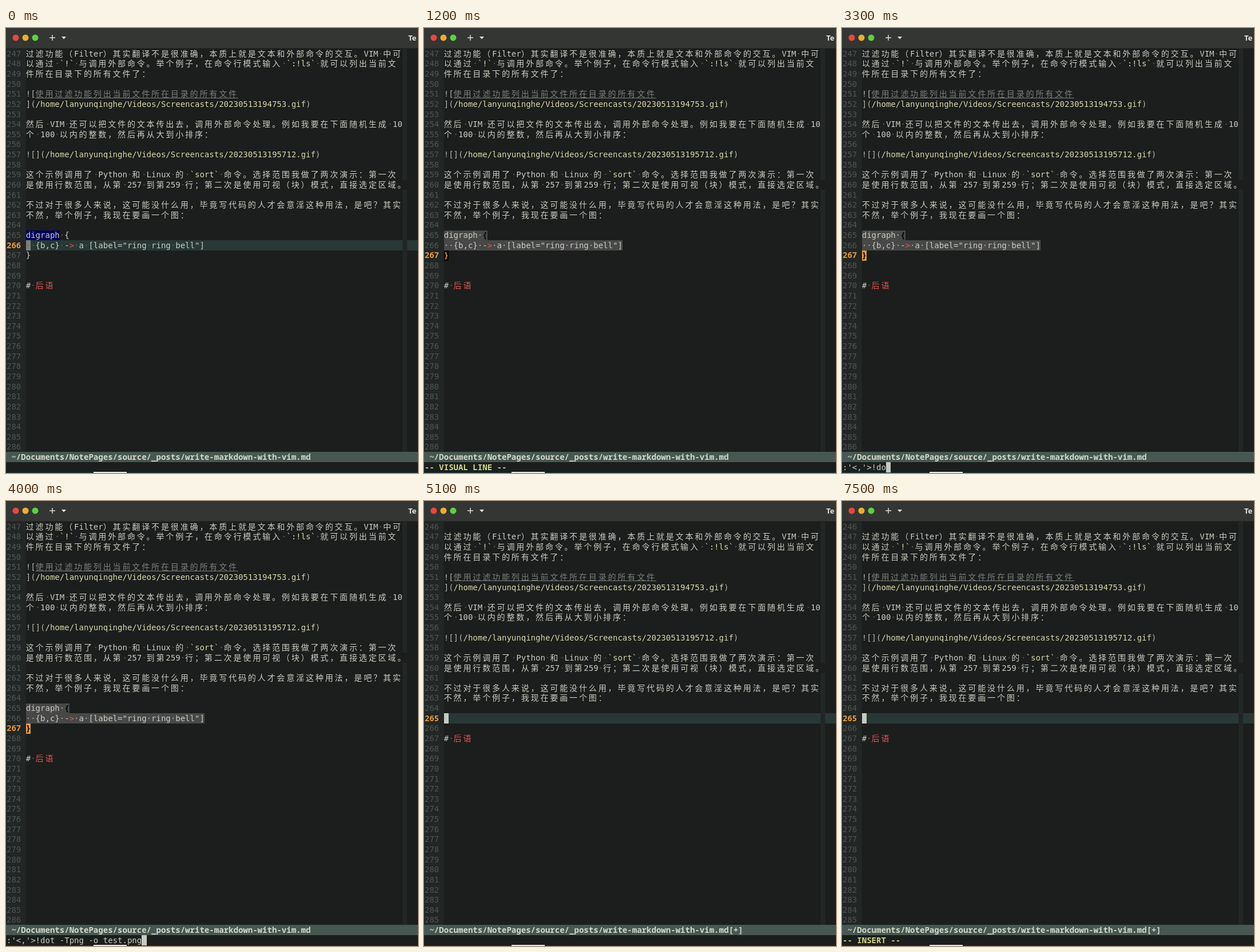
These frames come from a looping animation (720x778 px, 8 s). An HTML page with a canvas:

```html
<!DOCTYPE html>
<html lang="zh-CN">
<head>
<meta charset="utf-8">
<title>Terminal editor</title>
<style>
html, body { margin: 0; width: 100%; height: 100%; overflow: hidden; background: #1c1f1e; }
canvas { display: block; width: 720px; height: 778px; }
</style>
</head>
<body>
<canvas id="stage" width="720" height="778"></canvas>
<script>
const ctx = document.getElementById('stage').getContext('2d');
const LOOP = 8000, CW = 8.435, RH = 17.635, X0 = 1, Y0 = 36.2, BASE = 13.5;
const GUTTER = 4, ROWS = 40, MARGIN_COL = 78;
const MONO = '14px "DejaVu Sans Mono", monospace';
const MONO_BOLD = 'bold 14px "Noto Sans Mono", monospace';
const CJK = '14px "Noto Sans CJK SC", "Noto Sans CJK", sans-serif';
const C = {
  bg: '#1b1e1d', gutter: '#222625', line: '#283836', text: '#cbcbc0', dim: '#7c7f7a',
  dot: '#5c605d', num: '#505654', cur: '#e79a3c', code: '#d9d6a9', red: '#e2564c',
  visual: '#474847', status: '#465851', mode: '#d6d88a', block: '#c6cac2', word: '#00005c'
};

// Buffer text by line number; each part is [text, colour, underline].
const plain = s => [[s, C.text]];
const link = (head, path) => [[head, '#b4b5ab'], [path, C.code], [')', '#b4b5ab']];
const folder = '/home/lanyunqinghe/Videos/Screencasts/';
const prose = {
  247: plain('过滤功能（Filter）其实翻译不是很准确，本质上就是文本和外部命令的交互。VIM 中可'),
  248: [['以通过 ', C.text], ['`!`', C.code], [' 与调用外部命令。举个例子，在命令行模式输入 ', C.text],
        ['`:!ls`', C.code], [' 就可以列出当前文', C.text]],
  249: plain('件所在目录下的所有文件了：'),
  251: [['![', '#b4b5ab'], ['使用过滤功能列出当前文件所在目录的所有文件', C.dim, true]],
  252: link('](', folder + '20230513194753.gif'),
  254: plain('然后 VIM 还可以把文件的文本传出去，调用外部命令处理。例如我要在下面随机生成 10'),
  255: plain('个 100 以内的整数，然后再从大到小排序：'),
  257: link('![](', folder + '20230513195712.gif'),
  259: [['这个示例调用了 Python 和 Linux 的 ', C.text], ['`sort`', C.code],
        [' 命令。选择范围我做了两次演示：第一次', C.text]],
  260: plain('是使用行数范围，从第 257 到第259 行；第二次是使用可视（块）模式，直接选定区域。'),
  262: plain('不过对于很多人来说，这可能没什么用，毕竟写代码的人才会意淫这种用法，是吧？其实'),
  263: plain('不然，举个例子，我现在要画一个图：')
};
const heading = [['# ', C.text], ['后语', C.red]];
const graph = {
  265: plain('digraph {'),
  266: [['  {b,c} -', C.text], ['>', C.red], [' a [label="ring ring bell"]', C.text]],
  267: plain('}'),
  270: heading
};
const before = { ...prose, ...graph };
const after = { ...prose, 267: heading };

const colX = c => X0 + c * CW;
const rowY = r => Y0 + r * RH;
const isWide = ch => ch.charCodeAt(0) > 0x2e80;

function rect(x, y, w, h, color) {
  ctx.fillStyle = color;
  ctx.fillRect(x, y, w, h);
}

function cell(col, row, n, color) {
  const x = Math.round(colX(col)), y = Math.round(rowY(row));
  rect(x, y, Math.round(colX(col + n)) - x, Math.round(rowY(row + 1)) - y, color);
}

function put(col, row, text, color, bold) {
  ctx.fillStyle = color;
  for (const ch of text) {
    const wide = isWide(ch);
    ctx.font = wide ? CJK : bold ? MONO_BOLD : MONO;
    if (ch !== ' ') ctx.fillText(ch, colX(col), rowY(row) + BASE);
    col += wide ? 2 : 1;
  }
  return col;
}

function cursor(col, row, ch = ' ', color = C.block) {
  cell(col, row, 1, color);
  put(col, row, ch, C.bg);
}

function drawLine(parts, row, dotColor) {
  let col = GUTTER;
  for (const [text, color, underline] of parts) {
    const start = col;
    for (const ch of text) {
      const space = ch === ' ';
      col = put(col, row, space ? '·' : ch, space ? dotColor : color);
    }
    if (underline) rect(colX(start), Math.round(rowY(row) + 15), (col - start) * CW, 1, color);
  }
}

function header() {
  rect(0, 0, 720, 35, '#343634');
  rect(0, 35, 720, 1, '#242625');
  ['#e5493f', '#e8ae35', '#5ed043'].forEach((color, i) => {
    ctx.fillStyle = color;
    ctx.beginPath();
    ctx.arc(17 + 17 * i, 17, 5.5, 0, Math.PI * 2);
    ctx.fill();
  });
  rect(76, 16.3, 10, 1.4, '#e6e6e3');
  rect(80.3, 12, 1.4, 10, '#e6e6e3');
  ctx.beginPath();
  ctx.moveTo(97, 15);
  ctx.lineTo(105, 15);
  ctx.lineTo(101, 19.5);
  ctx.fill();
  ctx.font = 'bold 13px "Noto Sans", sans-serif';
  ctx.fillText('Te', 703, 21.5);
}

function editor(s) {
  const row = n => n - s.top;
  rect(0, 36, 720, 742, C.bg);
  rect(0, 36, colX(GUTTER), 706, C.gutter);
  if (!s.visual) {
    const y = Math.round(rowY(row(s.at)));
    rect(colX(GUTTER), y, 720, 18, C.line);
  }
  for (let r = 0; r < ROWS; r++) {
    if (s.top + r !== 260) cell(GUTTER + MARGIN_COL, r, 1, C.gutter);
  }
  if (s.word) cell(GUTTER, row(265), 7, C.word);
  if (s.visual) {
    cell(GUTTER, row(265), 9, C.visual);
    if (s.at > 265) cell(GUTTER, row(266), 37, C.visual);
  }
  if (!s.visual) cursor(GUTTER, row(s.at), ' ', s.word ? '#7b807d' : C.block);

  for (let r = 0; r < ROWS; r++) {
    const n = s.top + r, current = n === s.at;
    put(0, r, String(n), current ? C.cur : C.num, current);
    const selected = s.visual && n >= 265 && n <= s.at;
    if (s.lines[n]) drawLine(s.lines[n], r, selected ? '#aeb0aa' : C.dot);
  }
  if (s.visual && s.at === 265) cursor(GUTTER, row(265), 'd');
  if (s.visual && s.at === 267) {
    cell(GUTTER + 8, row(265), 1, C.visual);
    put(GUTTER + 8, row(265), '{', '#000', true);
    const typing = s.cmd !== undefined;
    cell(GUTTER, row(267), 1, typing ? C.cur : '#000');
    put(GUTTER, row(267), '}', typing ? '#000' : C.cur, true);
  }
}

function footer(s) {
  rect(0, 741, 720, 18, C.status);
  put(1, ROWS, '~/Documents/NotePages/source/_posts/write-markdown-with-vim.md' + (s.dirty ? '[+]' : ''),
    '#d3d7ca', true);
  if (s.mode) put(0, ROWS + 1, '-- ' + s.mode + ' --', C.mode, true);
  if (s.cmd !== undefined) {
    put(0, ROWS + 1, s.cmd, C.text);
    if (s.caret >= 0) cursor(s.caret, ROWS + 1, s.cmd[s.caret] || ' ');
  }
  rect(0, 777, 720, 1, '#12383a');
  rect(153, 776, 58, 2, '#e6e6e2');
}

// [time, characters of the command shown]
const command = ":'<,'>!dot -Tpng -o test.png";
const keys = [[2100, 6], [2800, 7], [3100, 8], [3300, 9], [3400, 10], [3600, 11], [4000, 28]];

function stateAt(t) {
  if (t >= 5100) {
    return { top: 246, lines: after, at: 265, dirty: true, mode: t >= 7100 ? 'INSERT' : '' };
  }
  const s = { top: 247, lines: before, at: 266 };
  if (t < 1000) return { ...s, word: true };
  s.visual = true;
  s.at = t < 1200 ? 265 : 267;
  if (t < 2100) return { ...s, mode: 'VISUAL LINE' };
  const [, count] = keys.filter(k => k[0] <= t).pop();
  s.cmd = command.slice(0, count);
  s.caret = t >= 4900 ? 0 : t >= 4600 ? -1 : count;
  return s;
}

const origin = performance.now();
function frame() {
  const s = stateAt((performance.now() - origin) % LOOP);
  editor(s);
  footer(s);
  header();
  requestAnimationFrame(frame);
}
frame();
</script>
</body>
</html>
```
